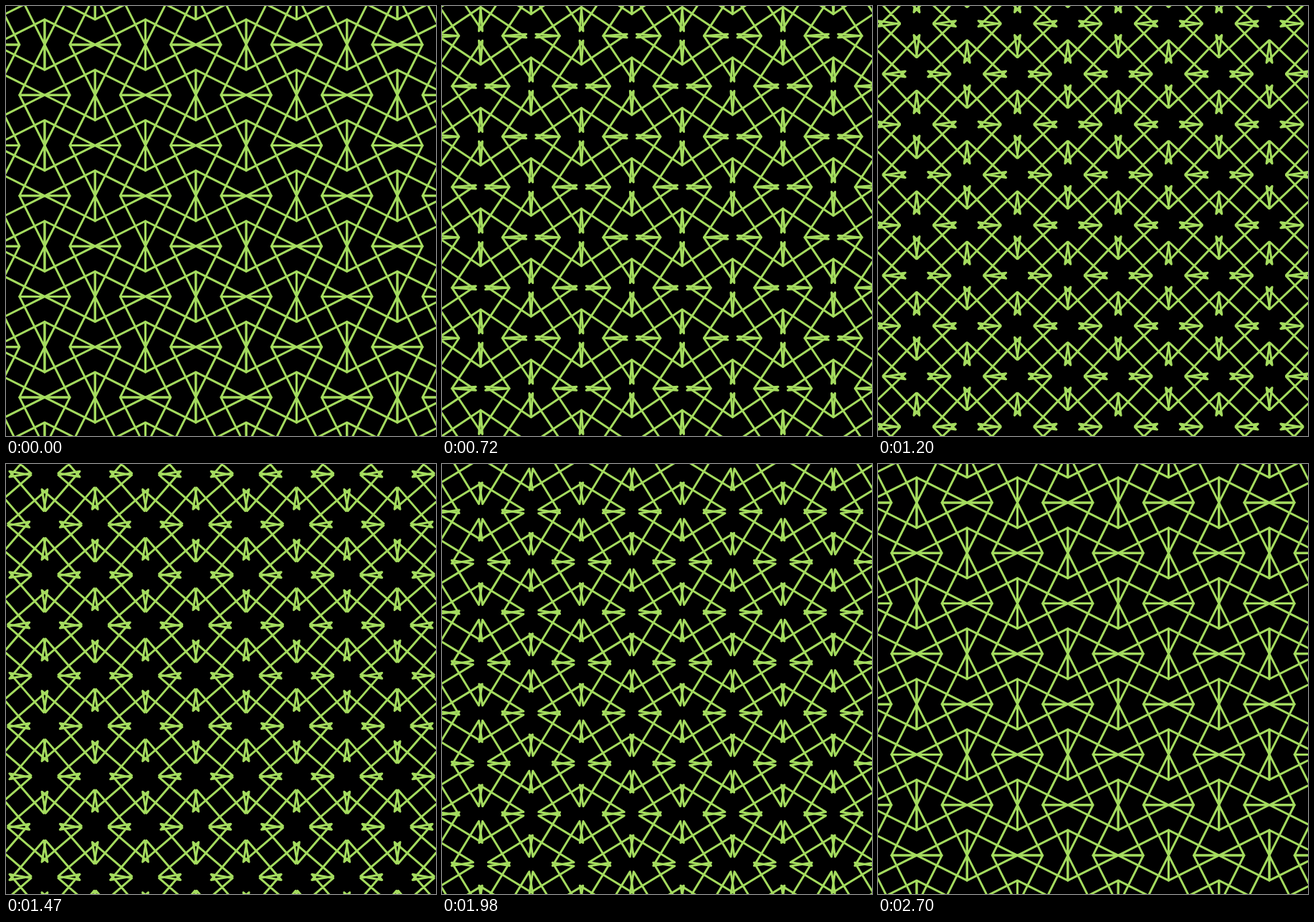
Recreate the animation shown at these times as an HTML page with a canvas. Size 600 px wide and 600 px high, loop 2730 ms.

```html
<!DOCTYPE html>
<html>
<head>
<meta charset="utf-8">
<style>
  html, body { margin: 0; width: 100%; height: 100%; overflow: hidden; background: #000; }
  canvas { display: block; }
</style>
</head>
<body>
<canvas id="stage" width="600" height="600"></canvas>
<script>
const ctx = document.getElementById('stage').getContext('2d');
const SIZE = 600, STEP_MS = 30, STEPS = 91;
const CELL = 70.3, HALF = CELL / 2, DIAGONAL = HALF * Math.SQRT2;

const smooth = t => t * t * (3 - 2 * t);
const lerp = (a, b, t) => a + (b - a) * t;

// Four long edges linked by short ones; the two kinds of vertex swap radii during a turn.
function addStar(x, y, spin, t) {
  const turn = smooth(t);
  const tipRadius = lerp(HALF, DIAGONAL, t ** 3);
  const tailRadius = lerp(DIAGONAL, HALF, turn);
  const addVertex = (eighth, radius) => {
    const angle = spin * (eighth + turn) * Math.PI / 4;
    ctx.lineTo(x + radius * Math.cos(angle), y + radius * Math.sin(angle));
  };
  for (let eighth = 8; eighth > 0; eighth -= 2) {
    addVertex(eighth, tipRadius);
    addVertex(eighth - 3, tailRadius);
  }
  ctx.closePath();
}

function draw(t) {
  ctx.fillStyle = '#000';
  ctx.fillRect(0, 0, SIZE, SIZE);
  ctx.strokeStyle = '#a5dc5f';
  ctx.lineWidth = 3;
  ctx.lineJoin = 'round';
  const rise = CELL * smooth(t);
  for (let row = -5; row <= 6; row++) {
    for (let col = -5; col <= 5; col++) {
      ctx.beginPath();
      addStar(SIZE / 2 + col * CELL, SIZE / 2 + row * CELL - rise, (row + col) % 2 ? 1 : -1, t);
      ctx.stroke();
    }
  }
}

function tick() {
  const step = Math.floor(performance.now() / STEP_MS) % STEPS;
  draw(step / (STEPS - 1));
  requestAnimationFrame(tick);
}
tick();
</script>
</body>
</html>
```
